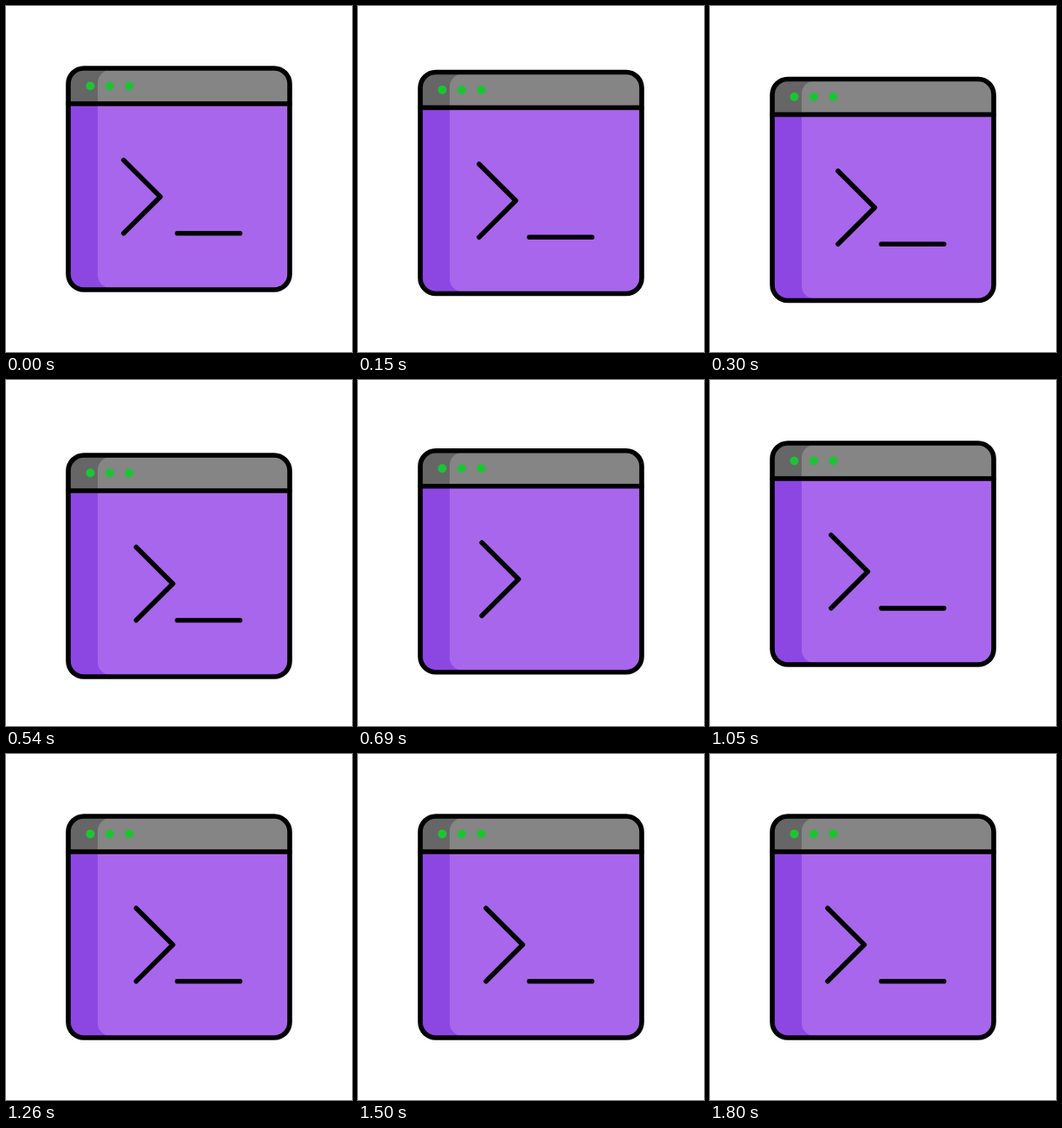
An HTML page for the animation above (1830 ms loop, 400 by 400 pixels).

```html
<!DOCTYPE html>
<html lang="en">
<head>
<meta charset="utf-8">
<title>Terminal window</title>
<style>
  html, body { margin: 0; width: 100%; height: 100%; overflow: hidden; background: #fff; }
  svg { display: block; width: 100vw; height: 100vh; }
  .line { fill: none; stroke: #000; stroke-width: 5.6; stroke-linecap: round; stroke-linejoin: round; }
</style>
</head>
<body>
<svg viewBox="0 0 400 400">
  <defs>
    <clipPath id="body"><rect x="72" y="72" width="256" height="256" rx="18"/></clipPath>
    <clipPath id="panel"><rect x="106" y="74" width="240" height="252" rx="15"/></clipPath>
  </defs>
  <g id="win">
    <g clip-path="url(#body)">
      <path fill="#666" d="M72 72h256v41H72z"/>
      <path fill="#8c47e3" d="M72 113h256v215H72z"/>
      <g clip-path="url(#panel)">
        <path fill="#858585" d="M72 72h256v41H72z"/>
        <path fill="#a866ec" d="M72 113h256v215H72z"/>
      </g>
    </g>
    <g fill="#1cc434">
      <circle cx="97.4" cy="92.5" r="5"/>
      <circle cx="119.9" cy="92.5" r="5"/>
      <circle cx="142.4" cy="92.5" r="5"/>
    </g>
    <path class="line" d="M72 113H328"/>
    <rect class="line" x="72" y="72" width="256" height="256" rx="18"/>
    <path class="line" id="chevron" d="M136 178.3L178.4 220.5L136 262.8"/>
    <path class="line" id="cursor" d="M198 262.8H270.5"/>
  </g>
</svg>
<script>
  const STEP = 30, STEPS = 61, SHIFT = 16;
  const [win, chevron, cursor] = ["win", "chevron", "cursor"].map(id => document.getElementById(id));

  // Cubic bezier easing with flat ends: (x1, 0, x2, 1)
  function ease(x, x1, x2) {
    if (x <= 0) return 0;
    if (x >= 1) return 1;
    let lo = 0, hi = 1, s = 0.5;
    for (let i = 0; i < 24; i++) {
      s = (lo + hi) / 2;
      const r = 1 - s;
      if (3 * s * r * r * x1 + 3 * s * s * r * x2 + s * s * s < x) lo = s;
      else hi = s;
    }
    return s * s * (3 - 2 * s);
  }

  // The window sinks quickly, then settles back slowly
  function drop(k) {
    return SHIFT * (k < 15 ? ease(k / 15, 0.333, 0.6) : 1 - ease((k - 15) / 27.5, 0.264, 0.322));
  }

  // The chevron swings twice per loop
  function swing(k) {
    return SHIFT * (1 - Math.cos(k / 15 * Math.PI)) / 2;
  }

  function draw(ms) {
    const k = Math.floor(ms / STEP) % STEPS;
    win.setAttribute("transform", `translate(0 ${drop(k).toFixed(3)})`);
    chevron.setAttribute("transform", `translate(${swing(k).toFixed(3)} 0)`);
    cursor.setAttribute("visibility", k % 30 < 22 ? "visible" : "hidden");
  }

  const start = performance.now();
  function tick() {
    draw(performance.now() - start);
    requestAnimationFrame(tick);
  }
  tick();
</script>
</body>
</html>
```
